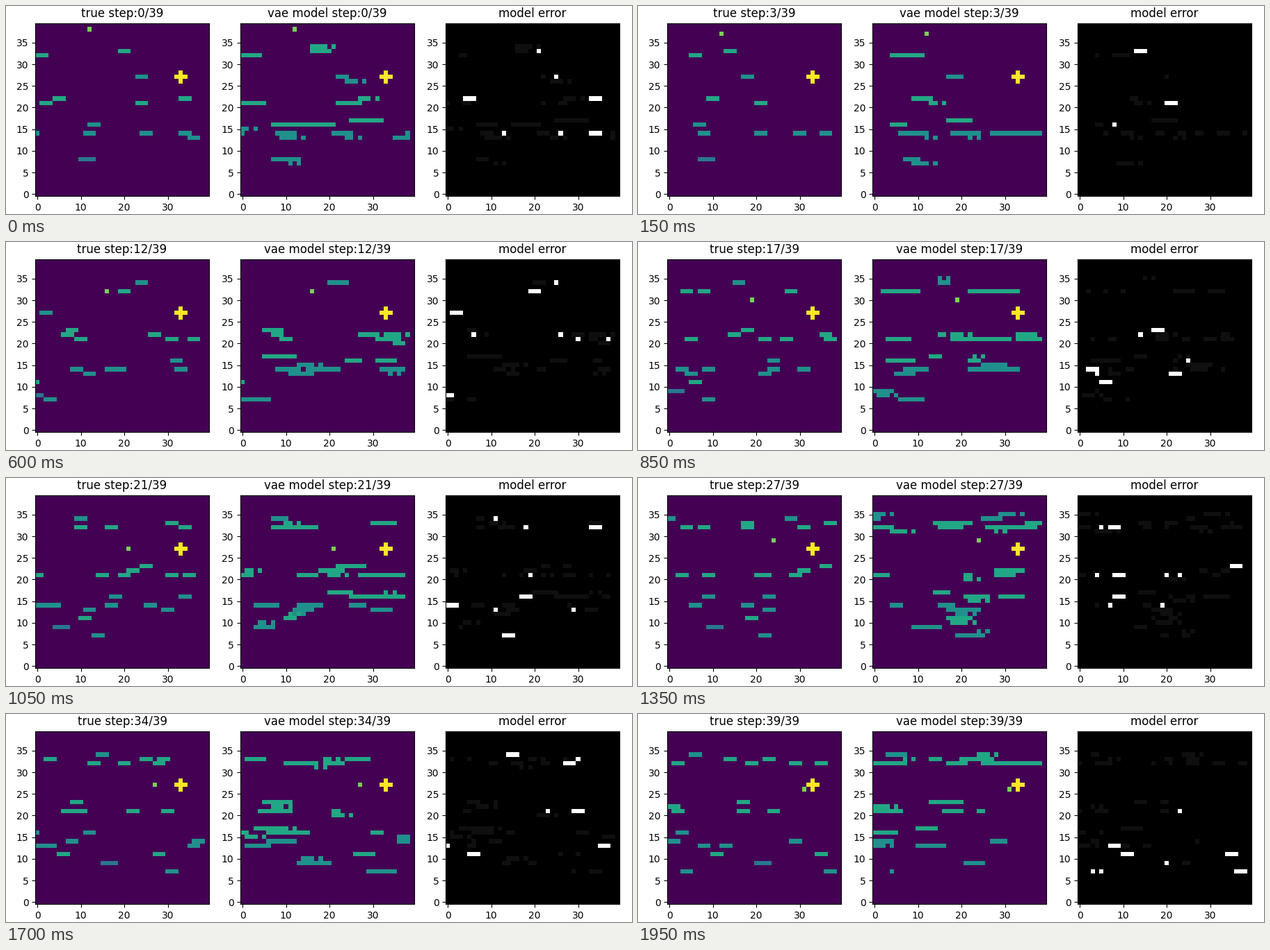
A matplotlib script that plays this animation: 900 by 300 pixels, repeating every 2000 ms.

```python
import numpy as np
import matplotlib.pyplot as plt
from matplotlib.animation import FuncAnimation

SIZE, STEPS = 40, 40
EDGE = 39                      # the last column stays empty
BLUE, TEAL, GREEN, AGENT, GOAL = 0.4, 0.5, 0.6, 0.8, 1.0

cars = []


def lane(row, hue, *runs, length=3):
    """Each run is (column at step 0, columns per step)."""
    cars.extend((row, hue, length, start, speed) for start, speed in runs)


lane(34, TEAL, (42.2, -1.6), (77.2, -1.86))
lane(33, GREEN, (19, -2.14), (75.15, -2.15), (67.6, -1.17), (98.8, -2.2))
lane(32, GREEN, (0, 1.58), (-21.1, 1.42), (-31.6, 2.27),
     (-31, 1.26), (-40, 1.74), (-49.7, 1.3))
lane(27, TEAL, (23, -1.86))
lane(23, GREEN, (-15.4, 1.88), (-46.4, 1.6))
lane(22, GREEN, (4, 1.83), (33, 1.8), (-14.24, 1.655), (-66.3, 1.7))
lane(21, GREEN, (1, -1.5), (23, -1.14), (56.6, -1.8), (52.8, -1.87),
     (63, -1.59), (79.1, -2.15), (55, -1), (69.8, -1.2))
lane(16, TEAL, (12, -1.86), (48.5, -1.5), (68.1, -1.69))
lane(14, TEAL, (-2, -1.4), (11, -1.3), (24, -1.3), (33, -1.45),
     (40.3, -1.9), (53.4, -1.36), (53.8, -1.8), (90.4, -1.6))
lane(13, TEAL, (35, 1.86), (-11.3, 1.9), (-26.9, 1.82), (-66, 2), (-47.6, 1.4))
lane(11, GREEN, (-17.4, 1.32), (-32.1, 1.09))
lane(9, BLUE, (-15.5, 0.91), length=4)
lane(8, BLUE, (10, -1), length=4)
lane(7, TEAL, (-13.6, 1.27), (-46.5, 1.27))


def fill(grid, row, first, last, hue):
    grid[row, max(first, 0):max(min(last + 1, EDGE), 0)] = hue


def traffic(step):
    for row, hue, length, start, speed in cars:
        x = int(np.floor(start + speed * step + 0.5))
        if -length < x <= EDGE - length:
            yield row, hue, length, x


def add_agent(grid, step):
    keys = [0, 7, 17, 21, 27, 34, 39]
    x = np.interp(step, keys, [12, 13, 19, 21, 24, 27, 31])
    y = np.interp(step, keys, [38, 35, 30, 27, 29, 27, 26])
    grid[int(round(y)), int(round(x))] = AGENT
    grid[26:29, 33] = grid[27, 32:35] = GOAL
    return grid


def true_grid(step):
    grid = np.zeros((SIZE, SIZE))
    for row, hue, length, x in traffic(step):
        fill(grid, row, x, x + length - 1, hue)
    return add_agent(grid, step)


def model_grid(step):
    """Smear most cars sideways, with ragged crumbs on the next row."""
    rng = np.random.default_rng(step)
    grid = np.zeros((SIZE, SIZE))
    for row, hue, length, x in traffic(step):
        seen, ragged, side = rng.random(3)
        reach = 5 if row in (16, 32) else 3
        first = x + rng.integers(-reach, 2)
        last = x + length - 1 + rng.integers(-1, reach + 1)
        crumb = rng.integers(first, last + 1)
        size = rng.integers(0, 4)
        if seen < 0.25:
            continue
        tone = GREEN if row == 16 else max(hue, TEAL)
        fill(grid, row, first, last, tone)
        if ragged < 0.4:
            beside = row + (1 if side < 0.6 else -1)
            fill(grid, beside, crumb, crumb + size, tone)
            fill(grid, beside, crumb + size + 2, crumb + size + 2, tone)
    for row in (16, 17):
        start = rng.integers(0, 33)
        fill(grid, row, start, start + rng.integers(2, 8), GREEN)
    return add_agent(grid, step)


def error_grid(true, model):
    missed = (true > 0) & (model == 0)
    extra = (model > 0) & (true == 0)
    return missed + 0.06 * extra


fig = plt.figure(figsize=(9, 3), dpi=100)


def panel(left, cmap):
    side = 249.7
    ax = fig.add_axes([left / 900, 25.6 / 300, side / 900, side / 300])
    image = ax.imshow(np.zeros((SIZE, SIZE)), cmap=cmap, vmin=0, vmax=1,
                      origin="lower", interpolation="nearest", aspect="auto")
    ax.set_xticks(range(0, SIZE, 10))
    ax.set_yticks(range(0, SIZE, 5))
    return image, ax.set_title("", fontsize=12)


true_im, true_title = panel(42.2, "viridis")
model_im, model_title = panel(337.2, "viridis")
error_im, error_title = panel(632.2, "gray")
error_title.set_text("model error")


def update(step):
    true, model = true_grid(step), model_grid(step)
    true_im.set_data(true)
    model_im.set_data(model)
    error_im.set_data(error_grid(true, model))
    true_title.set_text(f"true step:{step}/{STEPS - 1}")
    model_title.set_text(f"vae model step:{step}/{STEPS - 1}")
    return true_im, model_im, error_im, true_title, model_title


anim = FuncAnimation(fig, update, frames=STEPS, interval=50, repeat=True,
                     repeat_delay=0, blit=False)
plt.show()
```
